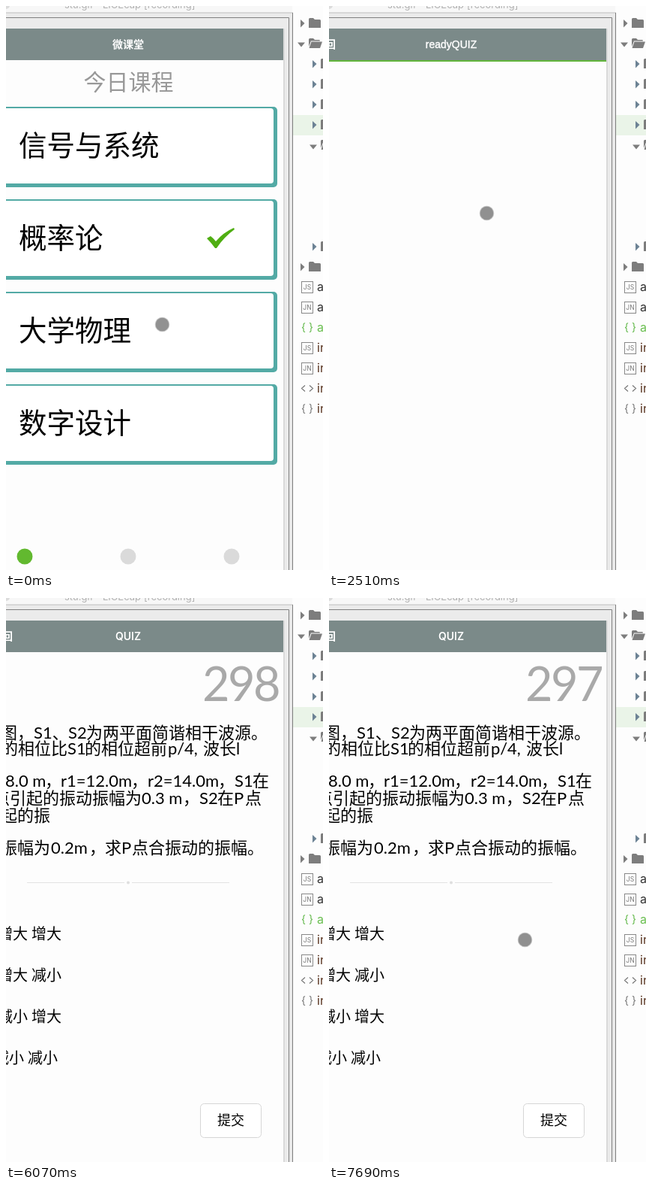
Animation of 423x750 px, one loop 7.99 s. Source, as an HTML page:

```html
<!DOCTYPE html>
<html lang="zh-CN">
<head>
<meta charset="utf-8">
<title>微课堂</title>
<style>
html, body { margin: 0; width: 100%; height: 100%; overflow: hidden; background: #fdfdfd; }
svg { display: block; width: 423px; height: 750px; }
text { font-family: "Noto Sans CJK SC", "Noto Sans CJK", sans-serif; white-space: pre; }
.mid { text-anchor: middle; }
.title { font-size: 14px; font-weight: 700; fill: #fff; }
.latin { font-family: Inter, sans-serif; font-weight: 600; }
.thin { font-family: "Liberation Sans", Arial, sans-serif; font-weight: 400; stroke: #fff; stroke-width: .4px; }
.course { font-size: 37.5px; }
.quiz { font: 22px Lato, "Noto Sans CJK SC", "Noto Sans CJK", sans-serif; }
.option { font-size: 20px; }
.count { font: 400 63px Lato, sans-serif; fill: #a9a9a9; text-anchor: end; letter-spacing: -2.5px; }
.file { font: 16px Inter, sans-serif; }
.tag { font: 8.5px Inter, sans-serif; fill: #777; text-anchor: middle; }
.brace { font: 14px Inter, sans-serif; fill: #777; text-anchor: middle; }

.anim { animation: 7990ms step-end infinite; }
#home { animation-name: home; }
#list { animation-name: list; }
#ready { animation-name: ready; }
#bar { animation-name: bar; }
#quiz { animation-name: quiz; }
#sheet { animation-name: sheet; }
#n300 { animation-name: n300; }
#n299 { animation-name: n299; }
#n298 { animation-name: n298; }
#n297 { animation-name: n297; }
#modal { animation-name: modal; }
#pointer { animation-name: travel; }
#ball { animation-name: ball; }
#arrow { animation-name: arrow; }

@keyframes home { 0% { opacity: 1 } 5.5% { opacity: 0 } }
@keyframes list { 0% { opacity: 0 } 5.5% { opacity: 1 } 25.9% { opacity: 0 } }
@keyframes ready { 0% { opacity: 0 } 25.9% { opacity: 1 } 51.81% { opacity: 0 } }
@keyframes bar {
  0% { opacity: 0; transform: scaleX(.4) }
  27.65% { opacity: 1; transform: scaleX(.4) }
  29.53% { opacity: 1; transform: scaleX(.8) }
  31.41% { opacity: 1; transform: scaleX(1) }
  33.29% { opacity: 0; transform: scaleX(1) }
}
@keyframes quiz { 0% { opacity: 0 } 51.81% { opacity: 1 } }
@keyframes sheet {
  0% { opacity: 0 }
  3.62% { opacity: 1 } 5.5% { opacity: 0 }
  24.02% { opacity: 1 } 25.9% { opacity: 0 }
  49.93% { opacity: 1 } 51.81% { opacity: 0 }
}
@keyframes n300 { 0% { opacity: 1 } 62.82% { opacity: 0 } }
@keyframes n299 { 0% { opacity: 0 } 62.82% { opacity: 1 } 75.96% { opacity: 0 } }
@keyframes n298 { 0% { opacity: 0 } 75.96% { opacity: 1 } 87.1% { opacity: 0 } }
@keyframes n297 { 0% { opacity: 0 } 87.1% { opacity: 1 } }
@keyframes modal {
  0% { opacity: 0 } 85.23% { opacity: .5 } 87.1% { opacity: 1 }
  94.49% { opacity: .4 } 96.24% { opacity: 0 }
}
@keyframes ball { 0% { opacity: 1 } 7.38% { opacity: 0 } 24.02% { opacity: 1 } }
@keyframes arrow { 0% { opacity: 0 } 7.38% { opacity: 1 } 24.02% { opacity: 0 } }
@keyframes travel {
  0% { transform: translate(208.5px, 423.5px) }
  7.38% { transform: translate(203px, 351px) }
  9.13% { transform: translate(203px, 330px) }
  11.01% { transform: translate(203px, 305px) }
  12.89% { transform: translate(202px, 285px) }
  14.76% { transform: translate(202px, 274px) }
  16.52% { transform: translate(202px, 270px) }
  18.39% { transform: translate(210.5px, 275.5px) }
  35.04% { transform: translate(206px, 268px) }
  36.92% { transform: translate(196px, 252px) }
  38.67% { transform: translate(168px, 244px) }
  40.55% { transform: translate(150.5px, 243.5px) }
  53.69% { transform: translate(146px, 270px) }
  55.44% { transform: translate(130px, 320px) }
  57.32% { transform: translate(112px, 380px) }
  59.19% { transform: translate(92px, 440px) }
  61.07% { transform: translate(73px, 480px) }
  62.82% { transform: translate(61px, 499px) }
  64.7% { transform: translate(35px, 478px) }
  66.58% { transform: translate(8px, 449px) }
  68.46% { transform: translate(-40px, 440px) }
  77.84% { transform: translate(60px, 520px) }
  79.72% { transform: translate(170px, 620px) }
  81.47% { transform: translate(265px, 685px) }
  83.35% { transform: translate(299.5px, 697.5px) }
  88.86% { transform: translate(262px, 469px) }
  90.73% { transform: translate(261.5px, 454.5px) }
}
</style>
</head>
<body>
<svg viewBox="0 0 423 750" xmlns="http://www.w3.org/2000/svg">
  <defs>
    <path id="shut" d="M0-5V5.500L5.500 0z"/>
    <path id="open" d="M-5-2.500H5L0 3.500z"/>
    <path id="folder" d="M0-5.500q0-1.500 1.500-1.500H6l2 2h6.500q1.500 0 1.500 1.500V6H0z"/>
    <path id="folderOpen" d="M0-5.500q0-1.500 1.500-1.500H6l2 2h6q1 0 1 1.500H3L0 4zM3.500-2.500H18L15 6H.5z"/>
    <g id="card">
      <rect x="-20" width="382" height="107" rx="5" fill="#53aaa5"/>
      <rect x="-20" y="2" width="377" height="100" rx="4" fill="#fff"/>
    </g>
    <g id="page">
      <rect y="30" width="370" height="720" fill="#fdfdfd"/>
      <rect y="30" width="370" height="42" fill="#7b8a89"/>
    </g>
    <rect id="box" x="394.500" y="-7.500" width="15" height="15" fill="none" stroke="#888"/>
  </defs>

  <!-- window and file tree -->
  <rect width="423" height="750" fill="#fdfdfd"/>
  <rect width="382" height="9" fill="#f7f7f7"/>
  <circle cx="0" cy="-1" r="5" fill="#dcdcdc"/>
  <g font-size="13" fill="#b2b2b2">
    <text class="latin" style="font-weight:400" y="3"><tspan x="78">stu.gif</tspan><tspan x="118">–</tspan><tspan x="129">LICEcap</tspan><tspan x="184">[recording]</tspan></text>
  </g>
  <rect y="9" width="382" height="741" fill="#ebebeb"/>
  <rect y="8.500" width="383" height="1" fill="#bdbdbd"/>
  <rect x="370" y="30" width="2" height="720" fill="#dadada"/>

  <rect x="383" y="145" width="40" height="27" fill="#eaf4e8"/>
  <g fill="#7d7d7d">
    <use href="#shut" x="393" y="23"/><use href="#folder" x="404" y="23"/>
    <use href="#open" x="394" y="51"/><use href="#folderOpen" x="404" y="50"/>
    <use href="#folder" x="420" y="77"/><use href="#folder" x="420" y="104"/>
    <use href="#folder" x="420" y="131"/><use href="#folder" x="420" y="158"/>
    <use href="#open" x="410" y="187"/><use href="#folderOpen" x="420" y="185"/>
    <use href="#folder" x="420" y="320"/>
    <use href="#shut" x="393" y="347"/><use href="#folder" x="404" y="347"/>
  </g>
  <g fill="#6c8294">
    <use href="#shut" x="409" y="77"/><use href="#shut" x="409" y="104"/>
    <use href="#shut" x="409" y="131"/><use href="#shut" x="409" y="158"/>
    <use href="#shut" x="409" y="320"/>
  </g>
  <use href="#box" y="374"/><use href="#box" y="401"/><use href="#box" y="455"/><use href="#box" y="482"/>
  <text class="tag" x="402" y="377">JS</text><text class="tag" x="402" y="404">JN</text>
  <text class="tag" x="402" y="458">JS</text><text class="tag" x="402" y="485">JN</text>
  <text class="brace" x="402" y="432" style="fill:#62b84a">{ }</text>
  <path d="M399 504.500l-4.500 4 4.500 4M405 504.500l4.500 4-4.500 4" fill="none" stroke="#777" stroke-width="1.200"/>
  <text class="brace" x="402" y="540">{ }</text>
  <g fill="#333">
    <text class="file" x="415" y="379">app.js</text><text class="file" x="415" y="406">app.json</text>
    <text class="file" x="415" y="433" fill="#6abf50">app.wxss</text>
  </g>
  <g fill="#55301c">
    <text class="file" x="415" y="460">index.js</text><text class="file" x="415" y="487">index.json</text>
    <text class="file" x="415" y="514">index.wxml</text><text class="file" x="415" y="541">index.wxss</text>
  </g>

  <!-- course list -->
  <g id="home" class="anim">
    <use href="#page"/>
    <text class="title mid" x="163" y="56">微课堂</text>
    <text class="mid" x="163.500" y="112" font-size="30" fill="#999">今日课程</text>
    <use href="#card" y="134"/><use href="#card" y="257"/><use href="#card" y="380"/><use href="#card" y="503"/>
    <text class="course" x="17" y="199">信号与系统</text>
    <text class="course" x="17" y="322">概率论</text>
    <text class="course" x="17" y="445">大学物理</text>
    <text class="course" x="17" y="568">数字设计</text>
    <path d="M268 309l5-3q4 3 7 7 10-12 24-18l1 2q-14 10-24 25h-2q-5-7-11-13z" fill="#4fae12"/>
    <circle cx="25" cy="732" r="10.500" fill="#62b92f"/>
    <circle cx="163" cy="732" r="10.500" fill="#dadada"/>
    <circle cx="301" cy="732" r="10.500" fill="#dadada"/>
  </g>

  <g id="list" class="anim" opacity="0">
    <use href="#page"/>
    <text class="title mid" x="163" y="56">测试列表</text>
  </g>

  <g id="ready" class="anim" opacity="0">
    <use href="#page"/>
    <text class="title" x="-19" y="56">返回</text>
    <text class="title thin mid" x="163" y="56">readyQUIZ</text>
    <rect id="bar" class="anim" y="72" width="370" height="2" fill="#62b53c"/>
  </g>

  <!-- question -->
  <g id="quiz" class="anim" opacity="0">
    <use href="#page"/>
    <text class="title" x="-19" y="56">返回</text>
    <text class="title latin mid" x="163" y="56">QUIZ</text>
    <text id="n300" class="count anim" x="364" y="137">300</text>
    <text id="n299" class="count anim" x="364" y="137">299</text>
    <text id="n298" class="count anim" x="364" y="137">298</text>
    <text id="n297" class="count anim" x="364" y="137">297</text>
    <text class="quiz" y="187"><tspan x="-7">图，</tspan><tspan x="37">S1、</tspan><tspan x="83">S2</tspan><tspan x="107">为两平面简谐相干波源。</tspan></text>
    <text class="quiz" y="208"><tspan x="-6">的相位比</tspan><tspan x="82">S1</tspan><tspan x="105">的相位超前</tspan><tspan x="216">p/4,</tspan><tspan x="263">波长l</tspan></text>
    <text class="quiz" y="251"><tspan x="-1">8.0 m</tspan><tspan x="52">，</tspan><tspan x="73">r1=12.0m</tspan><tspan x="167">，</tspan><tspan x="189">r2=14.0m</tspan><tspan x="283">，</tspan><tspan x="305">S1</tspan><tspan x="329">在</tspan></text>
    <text class="quiz" y="274"><tspan x="-17">点引起的振动振幅为</tspan><tspan x="181">0.3 m</tspan><tspan x="236">，</tspan><tspan x="258">S2</tspan><tspan x="282">在P</tspan><tspan x="319">点</tspan></text>
    <text class="quiz" x="-7" y="297">起的振</text>
    <text class="quiz" y="340"><tspan x="-7">振幅为</tspan><tspan x="60">0.2m</tspan><tspan x="111">，</tspan><tspan x="132">求P</tspan><tspan x="168">点合振动的振幅。</tspan></text>
    <path d="M28 378.500H158M168 378.500H298" stroke="#e3e3e3"/>
    <circle cx="163" cy="378.500" r="2" fill="#dedede"/>
    <g class="option">
      <text y="454"><tspan x="-11">增大</tspan><tspan x="34">增大</tspan></text>
      <text y="509"><tspan x="-11">增大</tspan><tspan x="34">减小</tspan></text>
      <text y="564"><tspan x="-11">减小</tspan><tspan x="34">增大</tspan></text>
      <text y="619"><tspan x="-16">减小</tspan><tspan x="29">减小</tspan></text>
    </g>
    <rect x="259.500" y="672.500" width="81" height="45" rx="5" fill="#fff" stroke="#d6d6d6"/>
    <text class="mid" x="300" y="701" font-size="18">提交</text>
  </g>

  <g id="modal" class="anim" opacity="0">
    <rect y="30" width="370" height="720" opacity=".44"/>
    <rect x="-13" y="330.500" width="352" height="136.500" rx="3" fill="#f9fafc"/>
    <text class="mid" x="163" y="366" font-size="17">提示</text>
    <text x="7.500" y="399" font-size="15" fill="#888" stroke="#888" stroke-width=".3">进入下一个问题</text>
    <rect x="162" y="424" width="1" height="43" fill="#dfe0e2"/>
    <text class="mid" x="75" y="452" font-size="17">取消</text>
    <text class="mid" x="251" y="452" font-size="17" font-weight="700" fill="#6abf3c">确定</text>
  </g>

  <rect id="sheet" class="anim" x="52" y="30" width="371" height="720" fill="#fdfdfd" opacity="0"/>

  <!-- window edge -->
  <rect x="378" y="16" width="4" height="734" fill="#e9e9e9"/>
  <path d="M0 15.500H377.500V750" fill="none" stroke="#808080"/>
  <path d="M382.500 9V750" stroke="#7c7c7c"/>

  <g id="pointer" class="anim">
    <g id="ball" class="anim">
      <circle r="9.500" opacity=".43"/>
      <circle r="10.200" fill="none" stroke="#fff" stroke-width="1.600" stroke-opacity=".7"/>
    </g>
    <path id="arrow" class="anim" d="M.5 0V14.500L4 11.300 6.300 16.500 8.700 15.400 6.500 10.400H11z" stroke="#fff" stroke-width="1.600" paint-order="stroke" style="filter:drop-shadow(0 1px 1px rgba(0,0,0,.35))"/>
  </g>
</svg>
</body>
</html>
```
